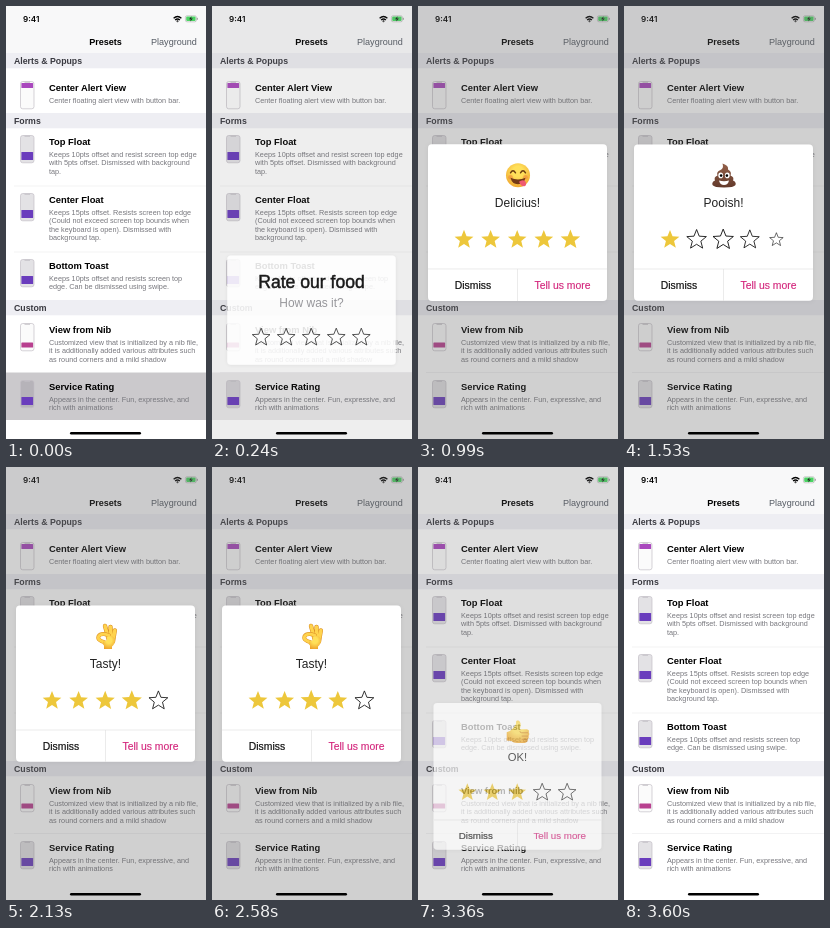
Write an HTML page that moves like this. It is 200 px wide and 433 px high and loops after 3.63 s.

```html
<!DOCTYPE html>
<html lang="en">
<head>
<meta charset="utf-8">
<title>Rating popup</title>
<style>
  html, body { margin: 0; width: 100%; height: 100%; overflow: hidden; background: #fff; }
  svg { display: block; width: 100vw; height: 100vh; font-family: "Liberation Sans", Arial, sans-serif; }
  .bold { font-weight: bold; }
  .mid { text-anchor: middle; }
  .clock { font: 600 8.1px Inter, sans-serif; }
</style>
</head>
<body>
<svg id="stage" viewBox="0 0 200 433">
  <defs>
    <radialGradient id="skin" cy=".35" r=".75"><stop offset=".3" stop-color="#ffe05a"/><stop offset="1" stop-color="#ec9a25"/></radialGradient>
    <linearGradient id="brown" x2="0" y2="1"><stop stop-color="#94614a"/><stop offset="1" stop-color="#633a2b"/></linearGradient>
    <filter id="shadow" x="-20%" y="-20%" width="140%" height="140%"><feDropShadow dx="0" dy=".5" stdDeviation="2" flood-opacity=".07"/></filter>
    <clipPath id="cardClip"><rect id="clipRect" x="10" width="179" rx="4"/></clipPath>
  </defs>
  <rect width="200" height="433" fill="#fff"/>
  <rect width="200" height="47" fill="#f8f8f9"/>
  <rect id="highlight" y="366.5" width="200" height="47.5" fill="#cbc9cc"/>
  <g id="list"></g>
  <g id="bars">
    <text class="clock" x="17" y="16.2">9:41</text>
    <g fill="none" stroke="#000" stroke-width="1.3">
      <path d="M167.6 12.2Q171.5 8.8 175.4 12.2M169.1 14Q171.5 12 173.9 14"/>
      <circle cx="171.5" cy="15.3" r=".3"/>
    </g>
    <rect x="179.4" y="9.8" width="11" height="6" rx="1.6" fill="#fff" stroke="#999" stroke-width=".5"/>
    <rect x="180.2" y="10.6" width="9.4" height="4.4" rx="1" fill="#4cd364"/>
    <path d="M191.3 11.8v2" stroke="#999"/>
    <path d="M185.6 10.2l-2.6 3h1.8l-.6 2.4 2.7-3.1h-1.8z" fill="#222"/>
    <text class="bold mid" x="99.5" y="39" font-size="9.07">Presets</text>
    <text x="145" y="39" font-size="9.07" fill="#555b64">Playground</text>
  </g>
  <rect id="dim" width="200" height="433" fill="#646464"/>
  <g id="popup">
    <rect id="card" x="10" width="179" rx="4" fill="#fff" filter="url(#shadow)"/>
    <g clip-path="url(#cardClip)">
      <g id="header"></g>
      <g id="buttons" font-size="10.4" class="mid">
        <path d="M10 0H189M99.5 0V40" stroke="#ddd" stroke-width=".6"/>
        <text x="55" y="20" fill="#111" stroke="#111" stroke-width=".2">Dismiss</text>
        <text x="144.5" y="20" fill="#d3267c" stroke="#d3267c" stroke-width=".15">Tell us more</text>
      </g>
    </g>
    <g id="stars"></g>
  </g>
  <rect x="64" y="426.1" width="71" height="2.4" rx="1.2"/>
</svg>
<script>
const LOOP = 3630, STEP = 30;
const $ = id => document.getElementById(id);

// List: [title baseline, title, description lines, block top, block height, block colour, phone shade]
const purple = '#6a3dbd';
const rows = [
  [85, 'Center Alert View', ['Center floating alert view with button bar.'], -8, 5, '#a948bd', .02],
  [139, 'Top Float', ['Keeps 10pts offset and resist screen top edge', 'with 5pts offset. Dismissed with background', 'tap.'], 7, 8, purple, .14],
  [197, 'Center Float', ['Keeps 15pts offset. Resists screen top edge', '(Could not exceed screen top bounds when', 'the keyboard is open). Dismissed with', 'background tap.'], 7, 8, purple, .14],
  [263, 'Bottom Toast', ['Keeps 10pts offset and resists screen top', 'edge. Can be dismissed using swipe.'], 7, 8, purple, .14],
  [327, 'View from Nib', ['Customized view that is initialized by a nib file,', 'it is additionally added various attributes such', 'as round corners and a mild shadow'], 9.5, 5, '#b8408f', .02],
  [384, 'Service Rating', ['Appears in the center. Fun, expressive, and', 'rich with animations'], 7, 8, purple, .14]
];
const sections = [[47, 'Alerts & Popups'], [107, 'Forms'], [294, 'Custom']];

const rowSvg = ([y, title, lines, top, height, color, shade]) => `
  <g transform="translate(0 ${y})">
    <rect x="14.5" y="-9.5" width="13.5" height="27.3" rx="2.2" fill="#3c3246" fill-opacity="${shade}" stroke="#c3bfc6" stroke-width=".7"/>
    <path d="M18.5 -8.8h5.5" stroke="#c3bfc6"/>
    <rect x="15.4" y="${top}" width="11.7" height="${height}" rx=".6" fill="${color}"/>
    <text class="bold" x="43" font-size="9.38">${title}</text>
    ${lines.map((s, i) => `<text x="43" y="${11.6 + i * 8.45}" font-size="7.27" fill="#77777d">${s}</text>`).join('')}
  </g>`;

$('list').innerHTML =
  '<path d="M8 180H200M8 246H200M8 366.5H200" stroke="#e4e4e6" stroke-width=".5"/>' +
  rows.map(rowSvg).join('') +
  sections.map(([y, s]) => `<rect y="${y}" width="200" height="15.3" fill="#eeeef3"/>
    <text class="bold" x="8" y="${y + 11.2}" font-size="8.75" fill="#3a3a41">${s.replace('&', '&amp;')}</text>`).join('');

// Emoji, drawn around 0,0 in a box of about 25
const yum = `<circle r="12" fill="url(#skin)"/>
  <g fill="#f08a3c" opacity=".6"><circle cx="-7.5" cy="2" r="2.4"/><circle cx="7.5" cy="2" r="2.4"/></g>
  <path d="M-7.5 -2.5q2.5 -4 5 0M2.5 -2.5q2.5 -4 5 0" fill="none" stroke="#6b3d12" stroke-width="1.4" stroke-linecap="round"/>
  <path d="M-7.5 2.5Q0 6 7.5 2.5Q6 9 0 9T-7.5 2.5z" fill="#743a15"/>
  <path d="M1 6.5Q4 4 7 5.5Q9.5 10 6.5 11Q3 11.5 1 6.5z" fill="#ef5a72"/>`;
const poo = `<path d="M-1.5 -12Q5 -10 4 -6Q8 -4 6.5 0Q10.5 1.5 9 5Q12.5 6.5 11.5 9.5Q10 12 0 12T-11.5 9.5Q-12.5 6.5 -9 5Q-10.5 1.5 -6.5 0Q-8 -4 -3.5 -5.5Q0 -7 -1.5 -12z" fill="url(#brown)"/>
  <g fill="#fff"><ellipse cx="-3.3" rx="2.4" ry="2.8"/><ellipse cx="3.3" rx="2.4" ry="2.8"/><path d="M-5 5Q0 6.5 5 5Q4 9.5 0 9.5T-5 5z"/></g>
  <circle cx="-2.9" cy=".2" r="1.3"/><circle cx="2.9" cy=".2" r="1.3"/>`;
const thumb = `<path d="M-12 0Q-8 -1 -5 -4.5Q-1.5 -8 -2 -11Q-1.5 -13 .5 -12.3Q4.5 -10 2 -3H9.5Q12.5 -2.5 11.5 .5Q13 2 11.3 4Q12.2 6 10.3 7.5Q10.8 11 7 11.5H-1Q-5 11.5 -7 9.5L-12 9z" fill="url(#skin)"/>
  <path d="M11 .7H4Q2 .5 2 -1M11 4.2H4M10 7.7H4" fill="none" stroke="#c97a1c" stroke-width=".8"/>`;
const okHand = `<g fill="none" stroke-linecap="round" stroke-linejoin="round">
    <path d="M3 4L-1 -10.5M5 4L4.5 -9.5M7 5L8.8 -6" stroke="#d98b22" stroke-width="4.4"/>
    <path d="M3 4L-1 -10.5M5 4L4.5 -9.5M7 5L8.8 -6" stroke="#ffd34d" stroke-width="3.4"/>
    <path d="M3 -1Q-5 -4 -7.5 0Q-9 4 -1 6" stroke="#e29a2a" stroke-width="4"/>
    <path d="M3 -1Q-5 -4 -7.5 0Q-9 4 -1 6" stroke="#ffd34d" stroke-width="2.8"/>
  </g>
  <path d="M1 0Q6 -2 9 2Q9.5 7 6 10V12.5H-2V9Q-4 7 -3 5Q2 5 1 0z" fill="url(#skin)"/>`;

const face = (emoji, label) => `<g><g transform="translate(100 31)">${emoji}</g>
  <text class="mid" x="99.5" y="62.3" font-size="12" fill="#222">${label}</text></g>`;
$('header').innerHTML = `<g class="mid">
    <text x="99.5" y="34" font-size="18.7" stroke="#000" stroke-width=".5">Rate our food</text>
    <text x="99.5" y="55" font-size="12.7" fill="#8e8e92">How was it?</text></g>` +
  face(yum, 'Delicius!') + face(poo, 'Pooish!') + face(okHand, 'Tasty!') + face(thumb, 'OK!');
const faces = [...$('header').children];

const starPath = 'M' + Array.from({length: 10}, (_, i) => {
  const r = i % 2 ? 4.3 : 9.9, a = i * Math.PI / 5;
  return `${(r * Math.sin(a)).toFixed(2)} ${(-r * Math.cos(a)).toFixed(2)}`;
}).join('L') + 'z';
$('stars').innerHTML = `<path d="${starPath}"/>`.repeat(5);
const stars = [...$('stars').children];

// Picks in the order of the faces
const picks = [
  {at: 0, count: 0}, {at: 750, count: 5}, {at: 1383, count: 1},
  {at: 1940, count: 4}, {at: 2600, count: 3}
];
const expandAt = picks[1].at, enterAt = 150, exitAt = 3250;

const ramp = (t, from, to) => Math.min(1, Math.max(0, (t - from) / (to - from)));
const ease = x => x * x * (3 - 2 * x);
const mix = (a, b, k) => a + (b - a) * k;
function spring(t, omega, damping) {
  if (t <= 0) return 0;
  const q = Math.sqrt(1 - damping * damping), a = omega * q * t;
  return 1 - Math.exp(-damping * omega * t) * (Math.cos(a) + damping / q * Math.sin(a));
}

function drawStar(star, i, t, y) {
  let filled = false, scale = 1;
  picks.forEach(({at, count}, k) => {
    if (!k) return;
    if (i === count - 1) scale = mix(scale, 1.12, ramp(t, at - 90, at - 40));
    const start = at + i * STEP;
    const changes = i < count || i < picks[k - 1].count;
    if (t < start || !changes) return;
    filled = i < count;
    scale = mix(.5, 1, spring(t - start, .042, .5));
  });
  star.setAttribute('transform', `translate(${46 + i * 26.6} ${y}) scale(${scale})`);
  star.setAttribute('fill', filled ? '#edc73b' : '#fff');
  star.setAttribute('stroke', filled ? 'none' : '#111');
  star.setAttribute('stroke-width', .85);
}

function draw(t) {
  const leave = ease(ramp(t, exitAt, exitAt + 300));
  const enter = spring(t - enterAt, .024, .85);
  const grow = spring(t - expandAt, .03, .8);
  const top = mix(158, 138.4, grow), bottom = mix(274, 294.8, grow);

  $('highlight').setAttribute('opacity', 1 - ramp(t, 120, 330));
  $('dim').setAttribute('opacity', .3 * ramp(t, enterAt, 400) * (1 - leave));

  const shift = 300 * (1 - enter + leave), scale = mix(.8, 1, enter) - .2 * leave;
  $('popup').setAttribute('transform', `translate(99.5 ${216.5 + shift}) scale(${scale}) translate(-99.5 -216.5)`);
  $('popup').setAttribute('opacity', t < enterAt ? 0 : mix(.7, 1, ramp(t, enterAt, 300)) * (1 - leave));
  for (const id of ['card', 'clipRect']) {
    $(id).setAttribute('y', top);
    $(id).setAttribute('height', bottom - top);
  }
  $('header').setAttribute('transform', `translate(0 ${top})`);
  $('buttons').setAttribute('transform', `translate(0 ${mix(274, 263, grow)})`);
  $('buttons').setAttribute('opacity', ramp(t, expandAt, expandAt + 120));

  faces.forEach((el, i) => {
    const next = picks[i + 1];
    const shown = i ? ramp(t, picks[i].at + 30, picks[i].at + 110) : 1;
    el.setAttribute('opacity', shown * (next ? 1 - ramp(t, next.at, next.at + 80) : 1));
  });
  stars.forEach((star, i) => drawStar(star, i, t, mix(245, 233.8, grow)));
}

function tick() {
  draw(performance.now() % LOOP);
  requestAnimationFrame(tick);
}
tick();
</script>
</body>
</html>
```
